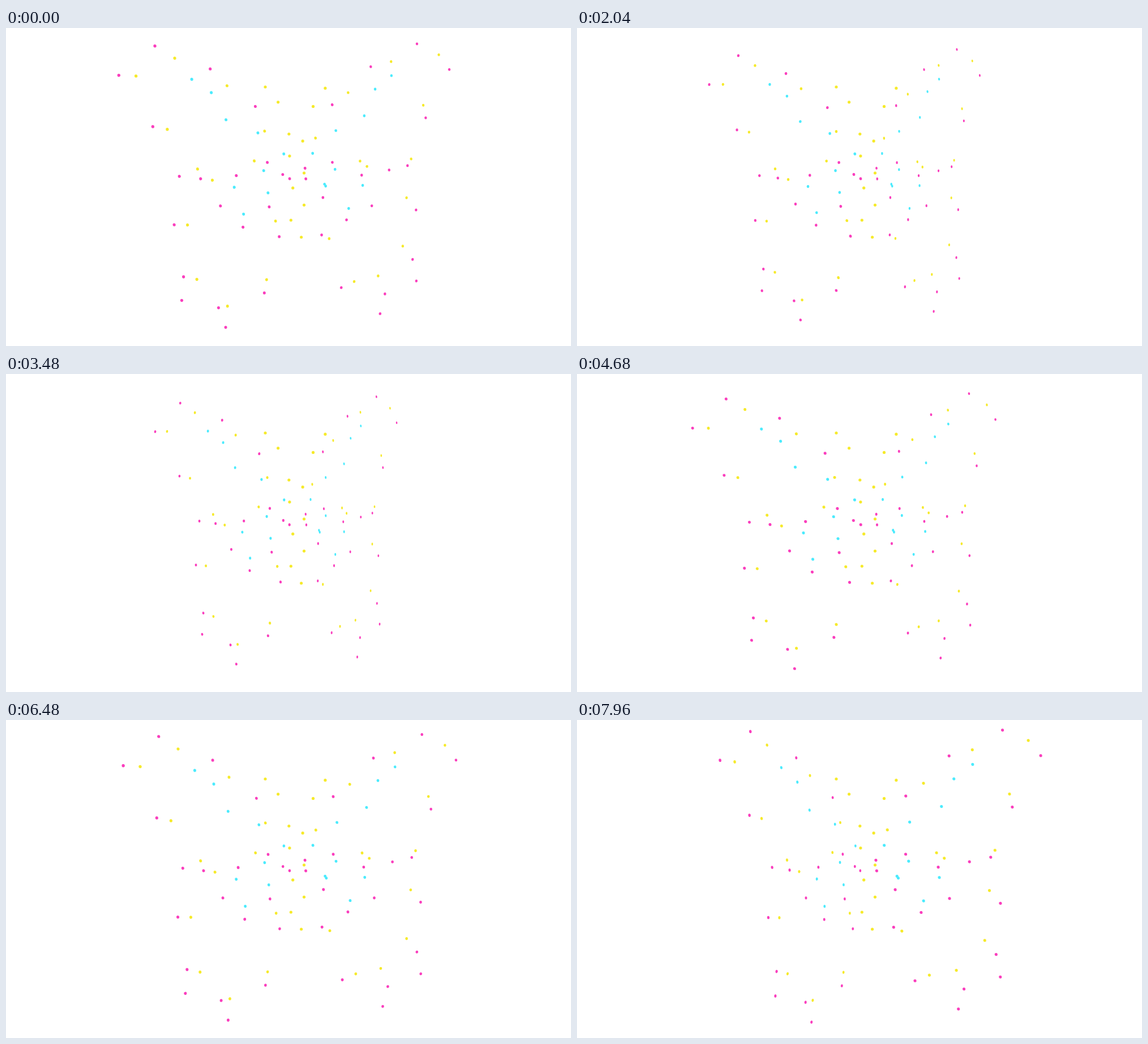
Animation of 998x561 px, one loop 8000 ms. Source, as an HTML page with a canvas:

```html
<!DOCTYPE html>
<html lang="en">
<head>
<meta charset="utf-8">
<title>Dotted butterfly</title>
<style>
  html, body { margin: 0; width: 100%; height: 100%; overflow: hidden; background: #fff; }
  canvas { display: block; width: 998px; height: 561px; }
</style>
</head>
<body>
<canvas id="stage" width="998" height="561"></canvas>
<script>
const ctx = document.getElementById('stage').getContext('2d');
const PINK = '#fa3ebd', YELLOW = '#f6ea2b', CYAN = '#4bebfd';
const LOOP = 8000, STEP = 40, TURN = 3010;
const EYE = { x: 515, y: 245, depth: 2025 };
const RADIUS = 2.6;

const body = [
  458, 104, 480.6, 130.8, 542.5, 138.4, 563.9, 106.2, 499.8, 187, 524.1, 199.4,
  500.9, 225.8, 526.5, 255.8, 506.7, 282.2, 526.5, 312.3, 503.3, 339, 521.6, 369
];

// Each wing turns about a slightly leaning hinge; dots are given as seen at time 0.
const wings = [
  {
    normal: [-1, 0.05], hinge: 18.05,
    angle: d => d < 2970 ? -43.2 + 0.0215 * d : 20.66 + 0.0119 * (d - 2970),
    dots: {
      [PINK]: [
        263, 31.8, 360.7, 72.2, 199.3, 83.4, 440.4, 138.4, 259.3, 174, 461.6, 237.2,
        306.2, 261.7, 343.8, 266, 406.8, 260.4, 488.8, 258.5, 501, 265.8, 378.8, 313.8,
        464.9, 315.6, 297.1, 347.1, 418.6, 351.3, 482.6, 368.2, 313.6, 439,
        310.4, 480.6, 375.4, 493.6, 456.3, 467.4, 388, 528.1
      ],
      [YELLOW]: [
        298, 53.2, 229.6, 84.8, 390.4, 101.8, 456.8, 181.8, 284.9, 178.8, 438.5, 234.5,
        338.4, 248.8, 364.5, 268.5, 476.1, 340.7, 320.6, 347.5, 337.1, 443.5,
        460.3, 444, 391.2, 490.7
      ],
      [CYAN]: [
        328.1, 90.5, 362.6, 114, 388.6, 161.8, 444.9, 185, 490.7, 222.1, 455.2, 251.7,
        403.2, 281, 462.8, 290.8, 419.6, 328.4
      ]
    }
  },
  {
    normal: [1, -0.046], hinge: 16.4,
    angle: d => -56.2 + 0.0114 * d,
    dots: {
      [PINK]: [
        725.9, 28, 644.3, 68.3, 783, 73.3, 576.2, 135.4, 741.3, 158.4, 576.4, 237,
        528.2, 247.3, 529.6, 266.1, 628.2, 259.6, 676.7, 250.5, 709.2, 242.8,
        559.8, 299.1, 646.1, 313.7, 724.3, 321, 601.5, 338.5, 557.5, 365.2,
        718.2, 408.2, 724.8, 446.3, 592.2, 458, 669.3, 469.1, 660.8, 504
      ],
      [YELLOW]: [
        764.5, 47.2, 680.2, 59.2, 604.3, 114, 737, 136.3, 546.7, 194.1, 625.4, 234.8,
        637.6, 244.2, 715.6, 231, 707.5, 299.5, 570.8, 371.6, 700.8, 384.8,
        657.3, 437.4, 615, 447.3
      ],
      [CYAN]: [
        680.8, 84.1, 652, 107.9, 632.8, 154.9, 582.6, 181, 541.7, 221.2, 581.2, 249.3,
        562.6, 275.5, 564.6, 278.8, 630, 277.6, 605.3, 318.4
      ]
    }
  }
];

const pairs = list => list.flatMap((x, i) => i % 2 ? [] : [[x, list[i + 1]]]);

function turnAt(wing, time) {
  const a = wing.angle(Math.abs(time - TURN)) * Math.PI / 180;
  return { cos: Math.cos(a), sin: Math.sin(a) };
}

// Screen point at time 0 -> distance from the hinge and foot on the hinge.
function unproject(wing, [x, y]) {
  const [nx, ny] = wing.normal;
  const { cos, sin } = turnAt(wing, 0);
  const dx = x - EYE.x, dy = y - EYE.y;
  const out = nx * dx + ny * dy;
  const reach = (out - wing.hinge) / (cos + out * sin / EYE.depth);
  const w = 1 - reach * sin / EYE.depth;
  return { reach, fx: dx * w - reach * cos * nx, fy: dy * w - reach * cos * ny };
}

function project([nx, ny], { cos, sin }, reach, fx, fy) {
  const w = 1 - reach * sin / EYE.depth;
  return [EYE.x + (fx + reach * cos * nx) / w, EYE.y + (fy + reach * cos * ny) / w];
}

for (const wing of wings) {
  wing.points = Object.entries(wing.dots).flatMap(([color, list]) =>
    pairs(list).map(p => ({ color, ...unproject(wing, p) })));
}
const bodyPoints = pairs(body);

function dot(color, ax, ay, bx, by, x, y) {
  ctx.setTransform(ax, ay, bx, by, x, y);
  ctx.fillStyle = color;
  ctx.beginPath();
  ctx.arc(0, 0, RADIUS, 0, Math.PI * 2);
  ctx.fill();
}

function draw(time) {
  ctx.setTransform(1, 0, 0, 1, 0, 0);
  ctx.fillStyle = '#fff';
  ctx.fillRect(0, 0, 998, 561);
  for (const [x, y] of bodyPoints) dot(YELLOW, 1, 0, 0, 1, x, y);
  for (const wing of wings) {
    const n = wing.normal, turn = turnAt(wing, time);
    const lean = Math.abs(n[1]);
    for (const { color, reach, fx, fy } of wing.points) {
      const [x, y] = project(n, turn, reach, fx, fy);
      const [ax, ay] = project(n, turn, reach + 1, fx, fy);
      const [bx, by] = project(n, turn, reach, fx + lean, fy + 1);
      dot(color, ax - x, ay - y, bx - x, by - y, x, y);
    }
  }
}

const start = performance.now();
function tick() {
  const time = (performance.now() - start) % LOOP;
  draw(Math.floor(time / STEP) * STEP);
  requestAnimationFrame(tick);
}
tick();
</script>
</body>
</html>
```
